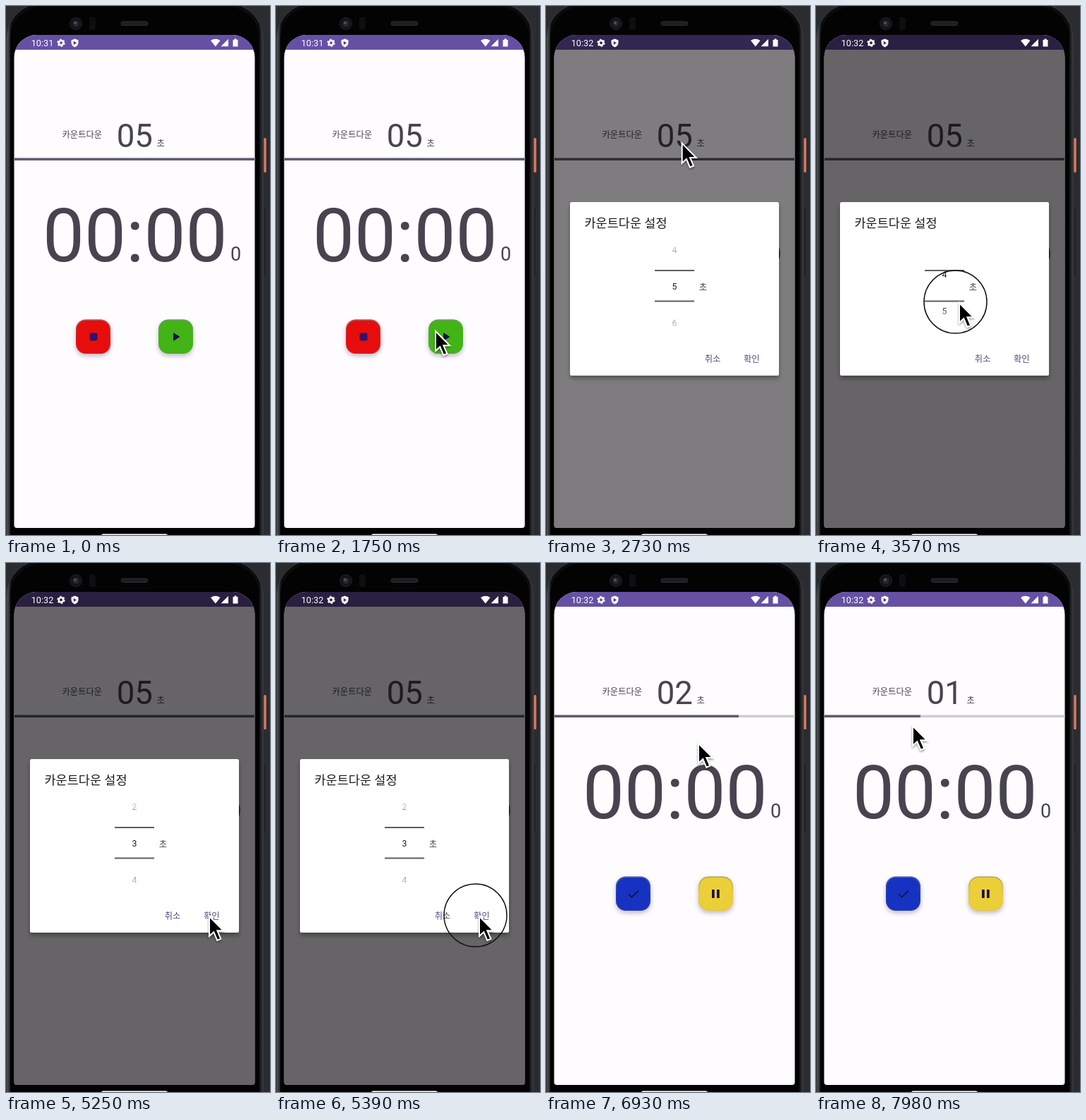
These frames come from a looping animation (374x750 px, 8000 ms). An HTML page:

```html
<!DOCTYPE html>
<html lang="ko">
<head>
<meta charset="utf-8">
<title>카운트다운</title>
<style>
html, body { margin: 0; width: 100%; height: 100%; overflow: hidden; background: #2b2c30; }
svg { display: block; width: 374px; height: 750px; }
text { font-family: Roboto, "Noto Sans CJK KR", "Noto Sans CJK", sans-serif; font-size: 12.3px; fill: #47444f; }
.mid { text-anchor: middle; }
.white, #clock { fill: #fff; }
.ink { fill: #1d1b20; }
.action { fill: #55487f; }
</style>
</head>
<body>
<svg viewBox="0 0 374 750">
  <defs>
    <clipPath id="screen"><path d="M11.5 73A32 32 0 0 1 43.5 41H320.5A32 32 0 0 1 352.5 73V736A4 4 0 0 1 348.5 740H15.5A4 4 0 0 1 11.5 736Z"/></clipPath>
    <linearGradient id="edge">
      <stop offset="0" stop-color="#5a5c60"/><stop offset=".018" stop-color="#0b0c0d"/>
      <stop offset=".985" stop-color="#0b0c0d"/><stop offset="1" stop-color="#38393d"/>
    </linearGradient>
    <linearGradient id="fade" gradientUnits="userSpaceOnUse" x1="0" y1="332" x2="0" y2="464">
      <stop offset="0" stop-color="#000"/><stop offset=".33" stop-color="#fff"/>
      <stop offset=".67" stop-color="#fff"/><stop offset="1" stop-color="#000"/>
    </linearGradient>
    <mask id="wheelMask" maskUnits="userSpaceOnUse" x="150" y="332" width="64" height="132" style="color-interpolation:sRGB">
      <rect x="150" y="332" width="64" height="132" fill="url(#fade)"/>
    </mask>
    <linearGradient id="rim" x1="0" y1="0" x2="0" y2="1">
      <stop offset="0" stop-color="#888" stop-opacity=".6"/><stop offset=".5" stop-color="#888" stop-opacity=".08"/>
    </linearGradient>
    <filter id="lift" x="-40%" y="-40%" width="180%" height="180%"><feDropShadow dx="0" dy="3" stdDeviation="3" flood-color="#201030" flood-opacity=".28"/></filter>
    <filter id="soft" x="-20%" y="-20%" width="140%" height="140%"><feDropShadow dx="0" dy="4" stdDeviation="3" flood-opacity=".32"/></filter>
    <filter id="shade" x="-50%" y="-50%" width="200%" height="200%"><feDropShadow dx="0" dy="2" stdDeviation="1.5" flood-opacity=".4"/></filter>
  </defs>

  <!-- phone body -->
  <rect width="374" height="750" fill="#2b2c30"/>
  <rect x="365.3" y="187" width="3.4" height="49" rx="1.5" fill="#dc7a61"/>
  <rect x="366" y="286" width="1.5" height="96" fill="#1e1f22"/>
  <rect x="1" y="-4" width="363" height="820" rx="50" fill="url(#edge)" stroke="#3c3d41"/>
  <rect x="6" y="1" width="353" height="810" rx="45" fill="#030304"/>
  <circle cx="99" cy="25" r="8.5" fill="#131417" stroke="#202226"/>
  <circle cx="99" cy="25" r="4.5" fill="#25282d"/>
  <circle cx="98" cy="24" r="1.8" fill="#555b62"/>
  <rect x="118" y="16" width="9" height="18" rx="2" fill="#0d0e10"/>
  <rect x="163" y="22" width="38" height="5.5" rx="2.7" fill="#1d1e21" stroke="#2c2d31"/>
  <rect x="135" y="748.5" width="94" height="5" rx="2.5" fill="#fff"/>

  <!-- app -->
  <g clip-path="url(#screen)">
    <rect x="11" y="41" width="342" height="700" fill="#fffcff"/>
    <rect x="11" y="41" width="342" height="21" fill="#6650a4"/>
    <text x="79.5" y="187">카운트다운</text>
    <text id="count" class="mid" x="182.3" y="199.5" style="font-size:45.5px">05</text>
    <text x="213.5" y="199">초</text>
    <rect x="11" y="215.5" width="342" height="3.5" fill="#cdccce"/>
    <rect id="bar" x="11" y="215.5" width="342" height="3.5" fill="#5f5b71"/>
    <text class="mid" x="182.7" y="362" style="font-size:105px">00:00</text>
    <text class="mid" x="325.7" y="361" style="font-size:27px">0</text>

    <g id="idle">
      <g filter="url(#lift)"><rect x="99" y="444.5" width="49" height="48.5" rx="14" fill="#e70c0e"/><rect x="216" y="444.5" width="49" height="48.5" rx="14" fill="#43b414"/></g>
      <rect x="119.3" y="464.3" width="9.4" height="9.4" rx="1" fill="#27128a" stroke="#4a1038" stroke-width="1.5"/>
      <path d="M237 463V475L246.5 469Z" fill="#1c1048"/>
    </g>
    <g id="active" display="none">
      <g filter="url(#lift)"><rect x="99" y="444.5" width="49" height="48.5" rx="14" fill="#1731c0"/><rect x="216" y="444.5" width="49" height="48.5" rx="14" fill="#ebcf39"/></g>
      <path d="M117 469.5L121.500 473.7L131 464.3" fill="none" stroke="#14104f" stroke-width="1.7"/>
      <path d="M235 463h3.7v12h-3.7zM242 463h3.7v12h-3.7z" fill="#1d1030"/>
    </g>
    <g fill="none" stroke="url(#rim)" stroke-width="1.5"><rect x="99.8" y="445.3" width="47.4" height="47" rx="13.2"/><rect x="216.8" y="445.3" width="47.4" height="47" rx="13.2"/></g>

    <rect id="dim" x="11" y="41" width="342" height="700" opacity="0"/>

    <g id="dialog" opacity="0">
      <rect x="34" y="278" width="296" height="246" rx="2.5" fill="#fff" filter="url(#soft)"/>
      <text class="ink" x="54.5" y="314" style="font-size:17.5px">카운트다운 설정</text>
      <g mask="url(#wheelMask)"><g id="wheel"></g></g>
      <path d="M154 375h56M154 418.5h56" stroke="#5f5d64" stroke-width="1.8"/>
      <text x="216.7" y="403">초</text>
      <text class="action" x="224.7" y="504.5">취소</text>
      <text class="action" x="280" y="504.5">확인</text>
    </g>
  </g>

  <!-- status bar -->
  <text id="clock" x="35.7" y="57" style="font-size:12.7px">10:31</text>
  <circle cx="78" cy="52.3" r="3.2" fill="none" stroke="#fff" stroke-width="2.5"/>
  <circle cx="78" cy="52.3" r="4.9" fill="none" stroke="#fff" stroke-width="1.5" stroke-dasharray="2.57"/>
  <path class="white" d="M97.5 46.5L102.5 48.5V52Q102.3 56.5 97.5 58.5Q92.7 56.5 92.5 52V48.5Z"/>
  <path d="M95.8 49.8V55L100 52.4Z" fill="#43366d"/>
  <path class="white" d="M290 49Q297 44.5 303.5 49L296.8 57.5ZM304.5 57.3L315 46.8V57.3ZM321.5 48h2v-1.5h3v1.5h2v9.5h-7z"/>

  <!-- pointer -->
  <circle id="ring" r="44.5" fill="none" stroke="#111" stroke-width="1.5"/>
  <path id="pointer" d="M0 0V28L6.3 22.2L11.3 34L16.3 31.8L11.3 20.3H20Z" fill="#000" stroke="#fff" stroke-width="2" filter="url(#shade)"/>
</svg>
<script>
const LOOP = 8000, STEP = 70;
const $ = id => document.getElementById(id);
const set = (id, name, value) => $(id).setAttribute(name, value);
const clamp = v => Math.max(0, Math.min(1, v));
const ramp = (t, from, to) => clamp((t - from) / (to - from));
const show = (id, on) => set(id, 'display', on ? 'inline' : 'none');

// time, x, y of the pointer tip
const path = [
  [280, 266, 664], [420, 238, 564], [560, 238, 564], [840, 130, 449], [910, 130, 449],
  [1190, 236, 465], [1330, 238, 466], [1750, 226, 461], [1820, 226, 461], [2100, 199, 188],
  [2310, 192, 173], [2660, 192, 172], [3290, 198, 376], [3430, 198, 376], [3570, 203, 421],
  [3710, 208, 459], [4270, 208, 459], [4970, 290, 499], [5250, 288, 501], [5530, 288, 501],
  [5880, 255, 463], [6160, 255, 463], [6720, 225, 262], [7560, 189, 237], [7980, 137, 231]
];
const presses = [[2450, 2590], [3430, 3780], [5390, 5460], [6020, 6160]];
const scroll = [[3430, 0], [3500, 12], [3570, 35], [3710, 76], [3850, 95], [4060, 104]];

// Interpolated values of a key list at time t
function at(keys, t) {
  if (t <= keys[0][0]) return keys[0].slice(1);
  const i = keys.findIndex(k => k[0] > t);
  if (i < 0) return keys[keys.length - 1].slice(1);
  const a = keys[i - 1], b = keys[i], p = ramp(t, a[0], b[0]);
  return a.slice(1).map((v, j) => v + (b[j + 1] - v) * p);
}

for (let n = 1; n < 9; n++)
  $('wheel').innerHTML += `<text class="mid ink" x="182" y="${402.3 + (n - 5) * 52}">${n}</text>`;

const START = 6170, SECONDS = 3;

function render(t) {
  const running = t >= START;
  const left = SECONDS * 10 - Math.max(0, Math.floor((t - START) / 100));
  const seconds = running ? Math.floor(left / 10) : t < 5500 ? 5 : SECONDS;
  $('count').textContent = '0' + seconds;
  $('clock').textContent = t < 2240 ? '10:31' : '10:32';
  set('bar', 'width', 0.5 + 341 * left / (SECONDS * 10));
  show('idle', !running);
  show('active', running);

  set('dialog', 'opacity', ramp(t, 2540, 2668) - ramp(t, 5500, 5640));
  set('dim', 'opacity', 0.6 * (ramp(t, 2540, 2765) - ramp(t, 5500, 5720)));
  set('wheel', 'transform', `translate(0 ${at(scroll, t)[0]})`);

  const [x, y] = at(path, t);
  set('pointer', 'transform', `translate(${x} ${y})`);
  set('ring', 'transform', `translate(${x - 5.5} ${y - 1.5})`);
  show('pointer', t >= path[0][0]);
  show('ring', presses.some(([down, up]) => t >= down && t < up));
}

function tick() {
  const t = performance.now() % LOOP;
  render(Math.floor(t / STEP) * STEP);
  requestAnimationFrame(tick);
}
tick();
</script>
</body>
</html>
```
